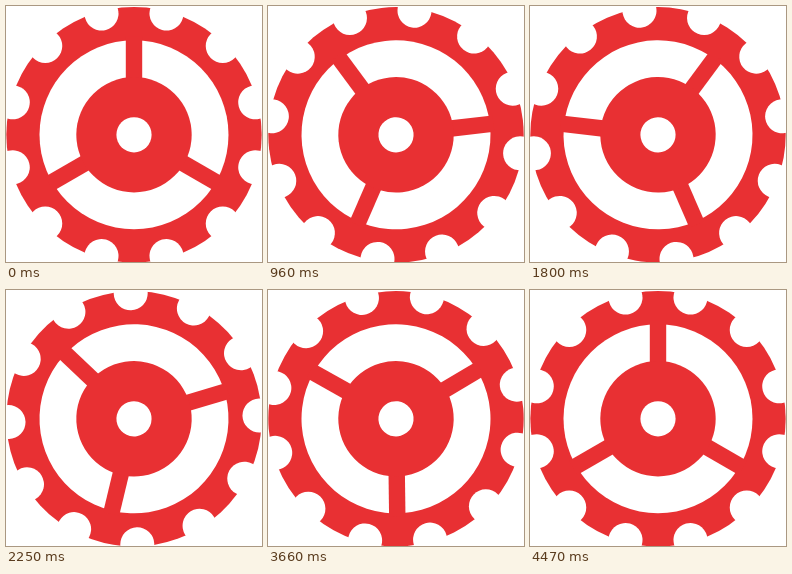
Recreate the animation shown at these times as an HTML page. Size 256 by 256 pixels, loop 4500 ms.

```html
<!DOCTYPE html>
<html lang="en">
<head>
<meta charset="utf-8">
<title>Turning gear</title>
<style>
  html, body { margin: 0; width: 100%; height: 100%; overflow: hidden; background: #fff; }
  svg { display: block; width: 100vw; height: 100vh; }
</style>
</head>
<body>
<svg viewBox="0 0 256 256">
  <g id="gear" fill="#e83033">
    <circle r="127.7"/>
    <g id="notches" fill="#fff"></g>
    <circle r="94.5" fill="#fff"/>
    <g id="spokes"></g>
    <circle r="57.7"/>
    <circle r="17.6" fill="#fff"/>
  </g>
</svg>
<script>
const LOOP = 4500, STEP = 30, LAST = LOOP - STEP, HALF_TURN = 2070;
const NOTCHES = 12, SPOKES = 3;
const gear = document.getElementById('gear');

function ring(id, count, shift, tag, attrs) {
  const parent = document.getElementById(id);
  for (let i = 0; i < count; i++) {
    const el = document.createElementNS('http://www.w3.org/2000/svg', tag);
    for (const key in attrs) el.setAttribute(key, attrs[key]);
    el.setAttribute('transform', `rotate(${shift + i * 360 / count})`);
    parent.append(el);
  }
}
ring('notches', NOTCHES, 180 / NOTCHES, 'circle', { cy: -125.5, r: 17 });
ring('spokes', SPOKES, 0, 'rect', { x: -8.2, y: -98, width: 16.4, height: 60 });

// Two half turns, each at its own steady speed.
function angle(t) {
  return t < HALF_TURN
    ? 180 * t / HALF_TURN
    : 180 + 180 * (t - HALF_TURN) / (LAST - HALF_TURN);
}

function draw() {
  const t = Math.floor(performance.now() % LOOP / STEP) * STEP;
  gear.setAttribute('transform', `translate(128 128.8) rotate(${angle(t)})`);
  requestAnimationFrame(draw);
}
draw();
</script>
</body>
</html>
```
